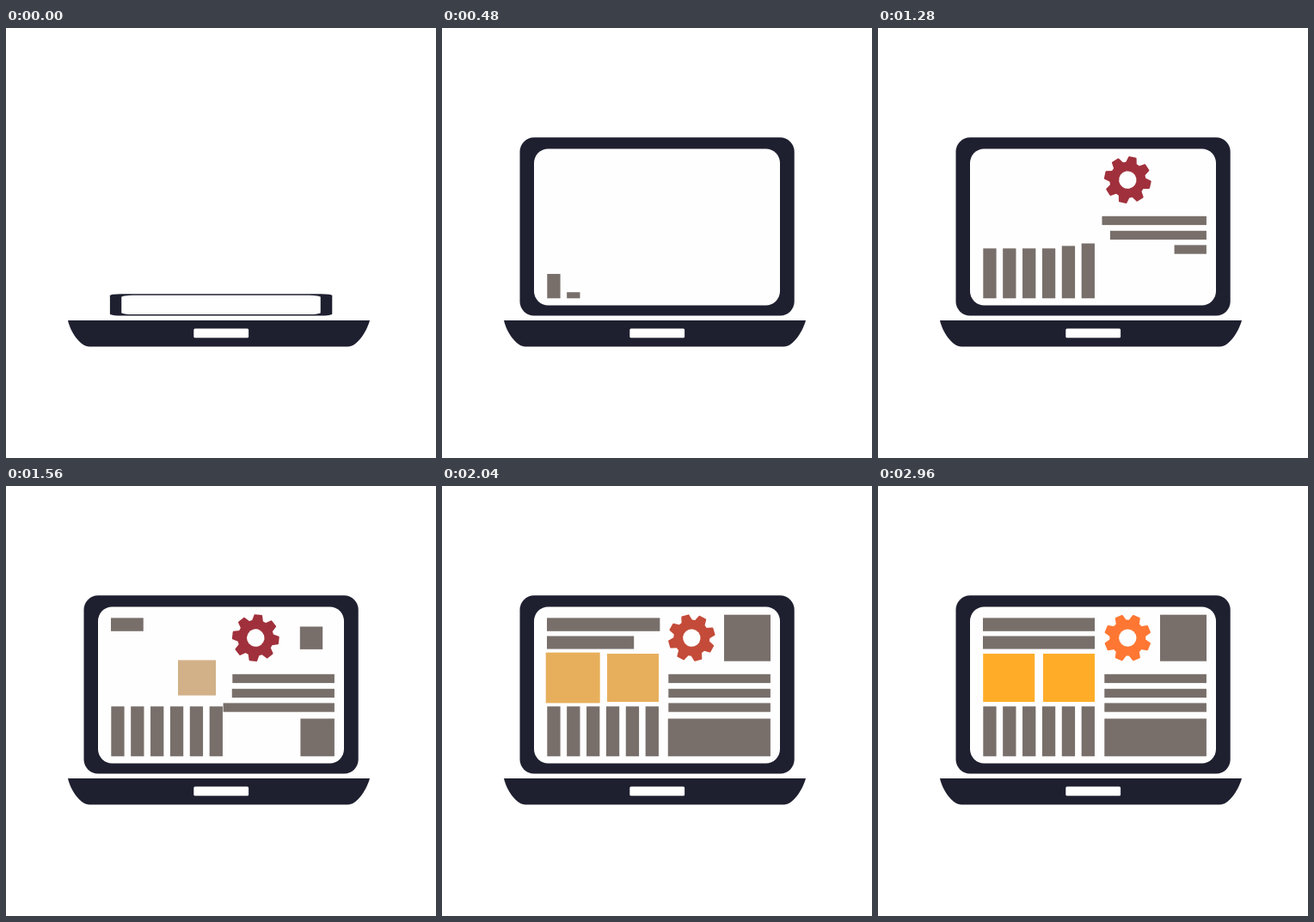
These frames come from a looping animation (500 by 500 pixels, 3.04 s). An HTML page:

```html
<!DOCTYPE html>
<html lang="en">
<head>
<meta charset="utf-8">
<title>Laptop dashboard</title>
<style>
  html, body { margin: 0; width: 100%; height: 100%; overflow: hidden; background: #fff; }
  svg { display: block; width: 100vw; height: 100vh; }
</style>
</head>
<body>
<svg id="stage" viewBox="0 0 500 500">
  <g id="lid">
    <rect x="90.5" y="127.3" width="319.2" height="207.2" rx="16.5" fill="#1e2030"/>
    <rect x="107" y="140.5" width="286" height="182" rx="16.5" fill="#fefefe"/>
  </g>
  <path d="M72 340H423C419 354 408 370.5 397.5 370.5H97C86.500 370.500 75 354 72 340Z" fill="#1e2030"/>
  <rect x="218.3" y="349.6" width="63.800" height="10.600" rx="1.500" fill="#fff"/>
  <g id="parts"></g>
  <g id="gear">
    <circle r="21"/>
    <g id="teeth"></g>
    <circle r="10.2" fill="#fefefe"/>
  </g>
</svg>
<script>
const LOOP = 3040, STEP = 40, LAST = 2960;
const GRAY = '#786f6b';
const TAN = [210, 177, 136], AMBER = [255, 173, 41];
const RED = [160, 49, 60], ORANGE = [255, 119, 51];
const NS = 'http://www.w3.org/2000/svg';
const $ = id => document.getElementById(id);

function add(parent, tag, attrs) {
  const el = document.createElementNS(NS, tag);
  for (const k in attrs) el.setAttribute(k, attrs[k]);
  return parent.appendChild(el);
}

const clamp = v => Math.min(1, Math.max(0, v));
const mix = (a, b, p) => a + (b - a) * p;
const blend = (a, b, p) => `rgb(${a.map((v, i) => Math.round(mix(v, b[i], p)))})`;

// Grow to 110 % at 60 % of the time, then settle at 100 %.
function pop(t, start, span = 600) {
  const p = clamp((t - start) / span);
  return p < 0.6 ? 1.1 * p / 0.6 : mix(1.1, 1, (p - 0.6) / 0.4);
}

const scaleAt = (x, y, sx, sy) =>
  `translate(${x} ${y}) scale(${sx} ${sy}) translate(${-x} ${-y})`;

const parts = [];
// ox, oy: fixed point inside the box, 0..1; grow: axes that scale
function part(x, y, w, h, start, grow, ox, oy, span, warm) {
  const el = add($('parts'), 'rect', { x, y, width: w, height: h, fill: GRAY });
  parts.push({ el, start, grow, span, warm, cx: x + w * ox, cy: y + h * oy });
}

for (let i = 0; i < 6; i++)
  part(122.3 + 22.87 * i, 256.3, 15.3, 58, 320 + 120 * i, 'y', 0, 1);

[[218.8, 10.3, 737], [235.8, 10.3, 971], [252.4, 10.3, 1177], [270.5, 43.8, 1451]]
  .forEach(([y, h, start]) => part(263.3, y, 118.6, h, start, 'x', 1, 0));

part(122, 153.4, 130, 15.4, 1465, 'x', 0, 0);
part(122, 174.5, 130, 15, 1719, 'x', 0, 0, 756);
part(328, 149.7, 54, 54, 1400, 'xy', 0.5, 0.5);
part(192, 195, 60, 56, 1320, 'xy', 0.5, 0.5, 600, true);
part(122.2, 195, 60, 56, 1560, 'xy', 0.5, 0.5, 600, true);

for (let i = 0; i < 8; i++)
  add($('teeth'), 'path', {
    d: 'M-5.600 -19L-3.800 -26.200H3.800L5.600 -19Z',
    transform: `rotate(${22.5 + 45 * i})`,
    'stroke-width': 2, 'stroke-linejoin': 'round'
  });

function draw(t) {
  const open = clamp(0.122 + 0.878 * t / 288);
  $('lid').setAttribute('transform', scaleAt(250, 334.5, mix(0.783, 1, open), open));

  const warmth = clamp((t - 1800) / 520);
  for (const p of parts) {
    const s = pop(t, p.start, p.span);
    const sx = p.grow.includes('x') ? s : 1;
    const sy = p.grow.includes('y') ? s : 1;
    p.el.setAttribute('visibility', s > 0 ? 'visible' : 'hidden');
    p.el.setAttribute('transform', scaleAt(p.cx, p.cy, sx, sy));
    if (p.warm) p.el.setAttribute('fill', blend(TAN, AMBER, warmth));
  }

  const size = pop(t, 840, 420);
  const angle = (t - LAST) * 0.14;
  const color = blend(RED, ORANGE, clamp((t - 1800) / 640));
  const gear = $('gear');
  gear.setAttribute('visibility', size > 0 ? 'visible' : 'hidden');
  gear.setAttribute('transform', `translate(290.3 176.6) rotate(${angle}) scale(${size})`);
  gear.setAttribute('fill', color);
  $('teeth').setAttribute('stroke', color);
}

const origin = performance.now();
function tick(now) {
  const t = Math.max(0, now - origin) % LOOP;
  draw(Math.min(LAST, Math.floor(t / STEP) * STEP));
  requestAnimationFrame(tick);
}
draw(0);
requestAnimationFrame(tick);
</script>
</body>
</html>
```
